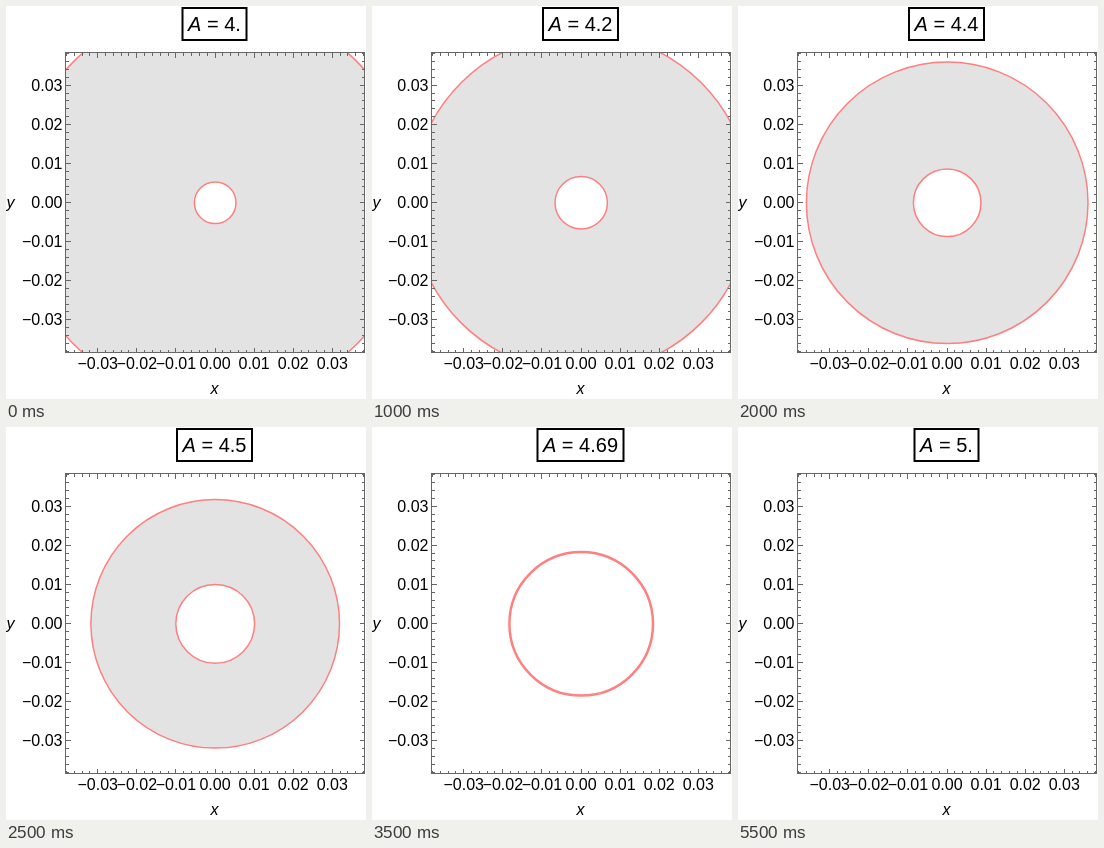
Write an HTML page that moves like this. It is 360 px wide and 393 px high and loops after 6000 ms.

```html
<!DOCTYPE html>
<html lang="en">
<head>
<meta charset="utf-8">
<title>Ring region by A</title>
<style>
html, body { margin: 0; width: 100%; height: 100%; overflow: hidden; background: #fff; }
svg { display: block; width: 360px; height: 393px; font: 16px "Liberation Sans", Arial, sans-serif; }
circle { stroke: #ff7f7f; stroke-width: 1.5; }
.frame { fill: none; stroke: #666; shape-rendering: crispEdges; }
.mid { text-anchor: middle; }
.end { text-anchor: end; }
.it { font-style: italic; }
</style>
</head>
<body>
<svg viewBox="0 0 360 393">
  <clipPath id="plot"><rect x="59.5" y="46.5" width="299" height="300"/></clipPath>
  <g id="ring" clip-path="url(#plot)">
    <circle id="outer" cx="209.2" cy="196.8" fill="#e3e3e3"/>
    <circle id="inner" cx="209.2" cy="196.8" fill="#fff"/>
  </g>
  <path id="axes" class="frame"/>
  <g id="labels"></g>
  <text class="it" x="0.5" y="202">y</text>
  <text class="it mid" x="208.5" y="388">x</text>
  <rect id="box" y="2" height="32" fill="#fff" stroke="#000" stroke-width="2"/>
  <text class="mid" x="208.5" y="25" font-size="20"><tspan class="it">A</tspan> = <tspan id="value"></tspan></text>
</svg>
<script>
const $ = id => document.getElementById(id);
const LEFT = 59.5, RIGHT = 358.5, TOP = 46.5, BOTTOM = 346.5;
const CX = 209, CY = 196.5, UNIT = 39.1, STEP = 500;

// value of A, outer radius, inner radius
const states = [
  ["4.", 200, 20.8], ["4.1", 185, 23.3], ["4.2", 169.8, 26.2], ["4.3", 156, 29.6],
  ["4.4", 140.8, 33.8], ["4.5", 124.3, 39.4], ["4.6", 105, 48], ["4.69", 72.3, 71.3],
  ["4.7"], ["4.8"], ["4.9"], ["5."]
];

function drawAxes() {
  let path = `M${LEFT} ${TOP}H${RIGHT}V${BOTTOM}H${LEFT}Z`;
  let labels = "";
  for (let i = -19; i <= 19; i++) {
    const major = i % 5 === 0, len = major ? 5 : 3;
    const x = Math.floor(CX + i * UNIT / 5) + 0.5;
    const y = Math.floor(CY - i * UNIT / 5) + 0.5;
    path += `M${x} ${TOP}v${len}M${x} ${BOTTOM}v${-len}M${LEFT} ${y}h${len}M${RIGHT} ${y}h${-len}`;
    if (major) {
      const text = (i < 0 ? "\u2212" : "") + (Math.abs(i) / 500).toFixed(2);
      labels += `<text class="mid" x="${CX + i * UNIT / 5}" y="363">${text}</text>` +
        `<text class="end" x="56.5" y="${y + 5}">${text}</text>`;
    }
  }
  $("axes").setAttribute("d", path);
  $("labels").innerHTML = labels;
}

let shown = -1;
function show(n) {
  if (n === shown) return;
  shown = n;
  const [value, outer, inner] = states[n];
  $("ring").style.display = outer ? "" : "none";
  if (outer) {
    $("outer").setAttribute("r", outer);
    $("inner").setAttribute("r", inner);
  }
  $("value").textContent = value;
  const width = 42 + 11 * value.length;
  $("box").setAttribute("x", 208.5 - width / 2);
  $("box").setAttribute("width", width);
}

const start = performance.now();
function tick() {
  show(Math.floor((performance.now() - start) / STEP) % states.length);
  requestAnimationFrame(tick);
}

drawAxes();
tick();
</script>
</body>
</html>
```
